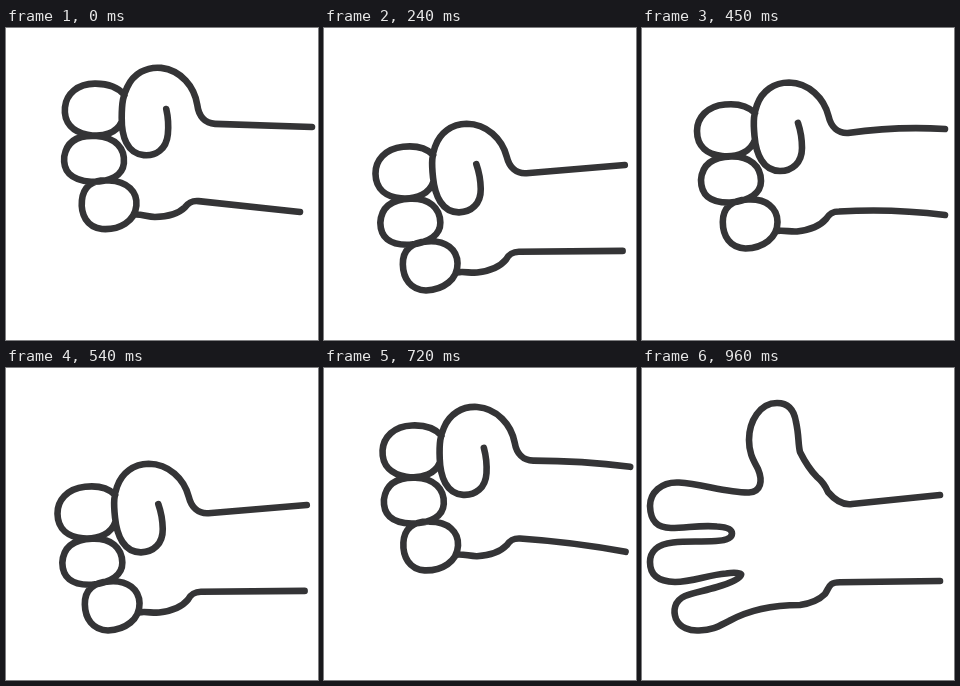
Write an HTML page that moves like this. It is 312 px wide and 312 px high and loops after 1440 ms.

```html
<!DOCTYPE html>
<html lang="en">
<head>
<meta charset="utf-8">
<title>Fist to open hand</title>
<style>
  html, body { margin: 0; width: 100%; height: 100%; overflow: hidden; background: #fff; }
  svg { display: block; width: 100vw; height: 100vh; }
  path { fill: none; stroke: #343436; stroke-width: 6.6; stroke-linecap: round; stroke-linejoin: round; }
</style>
</head>
<body>
<svg viewBox="0 0 312 312">
  <path id="fist"/>
  <path id="open"/>
</svg>
<script>
const LOOP = 1440, STEP = 30, SWING = 300, OPEN_AT = 750;
const fist = document.getElementById('fist');
const open = document.getElementById('open');

// Fist outlines, drawn around the middle finger at PIVOT
const PIVOT = [89, 151];
const FINGERS = [
  'M113 85 C105 77 93 75.5 83 76.5 C65 78 55 90 55 103 C55 119 66 126.5 80 128 C97 129.5 109 123 112.8 112',
  'M89 128.5 C108 128 119 138 119 153 C119 165 108 173 88 174.5 C67 175 59 166 59 152 C60 138 69 129 89 128.5',
  'M106 171.5 C124 170.5 135.5 180 135.5 194 C135.5 210 121 220 103.5 220.5 C88 220 80.8 208 80.8 194 C80.8 180 89 172 106 171.5'
].join(' ');
const THUMB = 'M156 95 C159 104 160 113 160 120 C160 135 150 143 138 143 C121 143 114 126 112.5 108 ' +
  'C111 92 112 85 115 77 C120 63 132 54.5 147 54.5 C167 55 182 70 186.5 88 C189 99 196 105.5 206 105';
const WRIST = 'M135 203 C142 202 148 204 155 203.5 C168 202 178 198 184 191 C187 186 190 183.5 197 183.5';

const OPEN_THUMB = 'M298 127 L210 136 C200 137.5 192 131 186 124 C183 117 180 113 175 109 ' +
  'C168 102 162 92 158 84 C156 76 157 67 154 54 C152 41 145 35 135 35 C118 35 107 53 107 72 ' +
  'C107 86 112 93 116 101 C121 113 119 124 107 124.5';
const OPEN_FINGERS = 'C86 125 60 116 37 114.5 C19 113.5 8 125 8 138 C8.5 153 15 160 29 160 ' +
  'C45 160 58 157 75 158.5 C84 159 90 161 90 165.5 C90 171 82 172.5 74 173 ' +
  'C55 174 46 173 31 174.5 C15 176 8 184 8 194 C8 207 16 213.5 33 214 C50 214 66 207 84 205.5';
const OPEN_PALM = 'C93 204 100 205 99 207 C97 212 85 216 75 219 C62 223 53 224 43 228 ' +
  'C32 233 31 243 34 251 C38 260 48 263 57 262.5 C72 262 77 258 87 253 C105 243 130 237 158 237 ' +
  'C172 235 178 231 183 226 C188 218 187 214.5 198 214.3 L298 213';
open.setAttribute('d', [OPEN_THUMB, OPEN_FINGERS, OPEN_PALM].join(' '));

// time, pivot x, y, angle, upper arm end x, y, lower arm end x, y, arm bend
const SWING_KEYS = [
  [-78, 86, 203, -2, 300, 143, 300, 229, 0],
  [0, 88.2, 130.4, 5.5, 306, 99, 294, 184, 0],
  [30, 90, 115, 8.6, 310, 98, 294, 182, 0],
  [62, 91, 109, 9.4, 312, 97, 296, 181, 2],
  [150, 89, 151, 0, 303, 101, 303, 187, -5],
  [222, 86, 203, -2, 300, 143, 300, 229, 0],
  [300, 88.2, 130.4, 5.5, 306, 99, 294, 184, 0]
];
// time, x, y, angle
const OPEN_KEYS = [
  [750, 4, -28, 1.2],
  [810, 2.3, 17.8, -0.9],
  [838, 2.3, 23, -1.2],
  [900, 1, 9, -0.5],
  [960, 0, 0, 0]
];

// Monotone cubic through the keys: flat at turning points
function sample(keys, t) {
  const last = keys.length - 1;
  if (t >= keys[last][0]) return keys[last].slice(1);
  let i = 0;
  while (t >= keys[i + 1][0]) i++;
  const span = keys[i + 1][0] - keys[i][0];
  const u = (t - keys[i][0]) / span;
  const slope = (k, c) => (keys[k + 1][c] - keys[k][c]) / (keys[k + 1][0] - keys[k][0]);
  const tangent = (k, c) => {
    if (k === 0 || k === last) return 0;
    const a = slope(k - 1, c), b = slope(k, c);
    return a * b <= 0 ? 0 : 2 * a * b / (a + b);
  };
  return keys[i].slice(1).map((from, n) => {
    const c = n + 1, to = keys[i + 1][c];
    const ease = u * u * (3 - 2 * u);
    return from + (to - from) * ease + span * (
      tangent(i, c) * u * (1 - u) * (1 - u) - tangent(i + 1, c) * u * u * (1 - u));
  });
}

function place(d, x, y, angle) {
  const r = angle * Math.PI / 180, cos = Math.cos(r), sin = Math.sin(r);
  return d.replace(/([\d.]+) ([\d.]+)/g, (_, px, py) => {
    const dx = px - PIVOT[0], dy = py - PIVOT[1];
    return (x + dx * cos - dy * sin).toFixed(2) + ' ' + (y + dx * sin + dy * cos).toFixed(2);
  });
}

function withArm(d, ex, ey, bend) {
  const [sx, sy] = d.split(' ').slice(-2).map(Number);
  return `${d} Q${(sx + ex) / 2} ${(sy + ey) / 2 + bend} ${ex} ${ey}`;
}

function drawFist(t) {
  let [x, y, angle, ux, uy, lx, ly, bend] = sample(SWING_KEYS, t % SWING);
  // The forearm flexes a little more on the last swing
  const flex = Math.max(0, 1 - Math.abs(t - 630) / 60);
  y -= 1.5 * flex;
  ux -= flex;
  lx += 4 * flex;
  ly -= flex;
  bend += 4 * flex;
  fist.setAttribute('d', [
    place(FINGERS, x, y, angle),
    withArm(place(THUMB, x, y, angle), ux, uy, bend),
    withArm(place(WRIST, x, y, angle), lx, ly, bend)
  ].join(' '));
}

function drawOpen(t) {
  const [x, y, angle] = sample(OPEN_KEYS, t);
  open.setAttribute('transform', `translate(${x} ${y}) rotate(${angle} 298 170)`);
}

function draw(now) {
  const t = Math.floor((now % LOOP) / STEP) * STEP;
  const opened = t >= OPEN_AT;
  fist.style.display = opened ? 'none' : '';
  open.style.display = opened ? '' : 'none';
  if (opened) drawOpen(t);
  else drawFist(t);
}

const start = performance.now();
function tick() {
  draw(performance.now() - start);
  requestAnimationFrame(tick);
}
tick();
</script>
</body>
</html>
```
